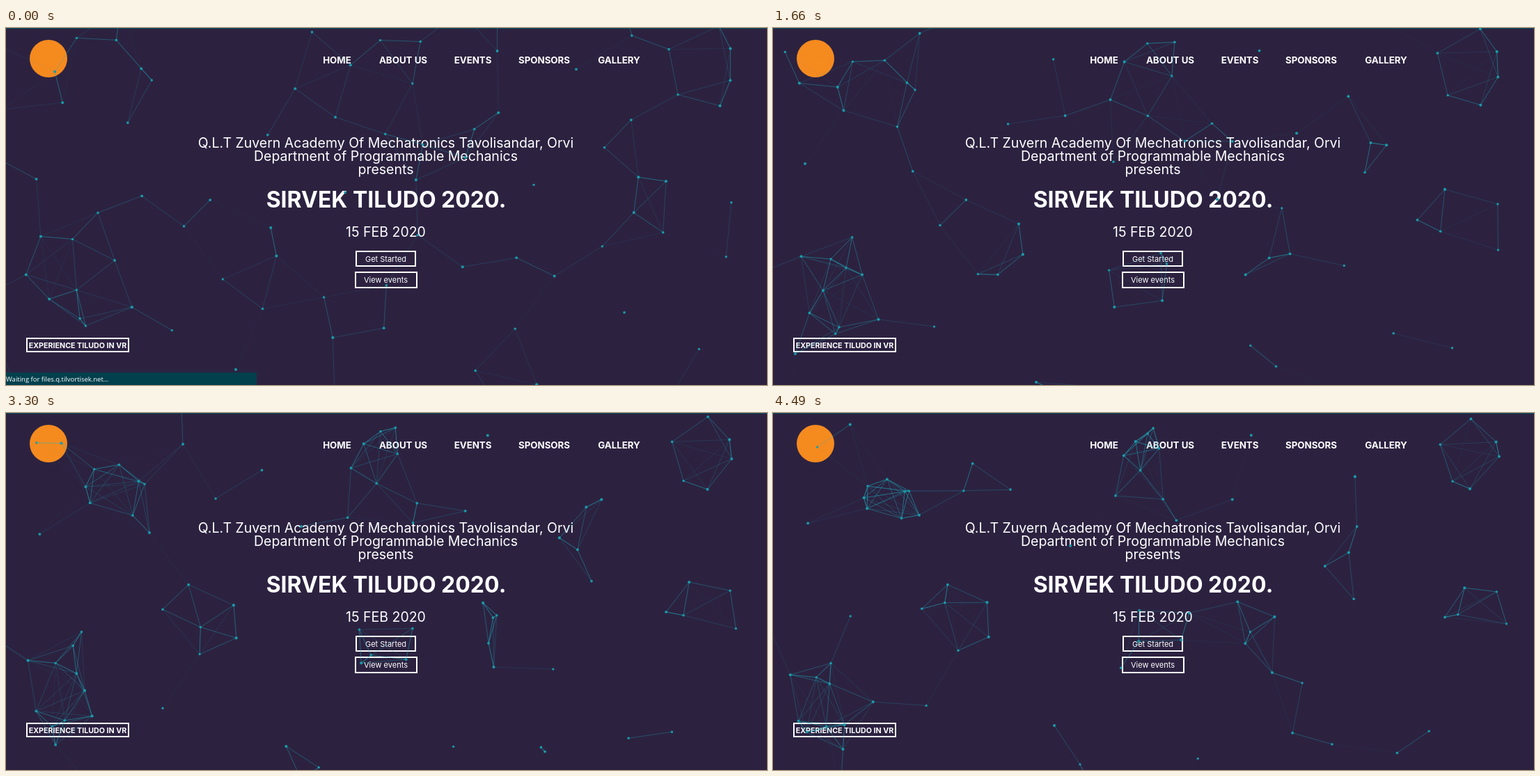
Recreate the animation shown at these times as an HTML page with a canvas. Size 1093 by 513 pixels, loop 4.57 s.

```html
<!DOCTYPE html>
<html lang="en">
<head>
<meta charset="utf-8">
<title>Event landing page</title>
<style>
  html, body { margin: 0; width: 100%; height: 100%; overflow: hidden; background: #2c2240; }
  svg, canvas { position: absolute; left: 0; top: 0; width: 1093px; height: 513px; }
  text { fill: #fff; font-family: Inter, sans-serif; text-anchor: middle; }
  .nav { font-size: 13.3px; font-weight: 700; }
  .lead { font-size: 19.5px; }
  .title { font-size: 32px; font-weight: 700; }
  .button { font-size: 11px; }
  .vr { font-size: 10.7px; font-weight: 700; }
  .frame { fill: none; stroke: #fff; stroke-width: 2; }
  .status { animation: hide 4570ms step-end infinite; }
  .status text { font: 9.5px "Open Sans", sans-serif; text-anchor: start; }
  @keyframes hide { 0% { opacity: 1; } 7%, 100% { opacity: 0; } }
</style>
</head>
<body>
<svg viewBox="0 0 1093 513">
  <rect width="1093" height="1" fill="#07535f"/>
  <circle cx="61" cy="44" r="27" fill="#f58a1f"/>
  <g class="nav">
    <text x="475.5" y="51">HOME</text>
    <text x="570.5" y="51">ABOUT US</text>
    <text x="670.5" y="51">EVENTS</text>
    <text x="773" y="51">SPONSORS</text>
    <text x="880.5" y="51">GALLERY</text>
  </g>
  <g class="lead">
    <text x="545.5" y="171.5">Q.L.T Zuvern Academy Of Mechatronics Tavolisandar, Orvi</text>
    <text x="545.5" y="191">Department of Programmable Mechanics</text>
    <text x="545.5" y="210">presents</text>
    <text x="545.5" y="300">15 FEB 2020</text>
  </g>
  <text class="title" x="546" y="258">SIRVEK TILUDO 2020.</text>
  <g class="button">
    <rect class="frame" x="503" y="321" width="85" height="21"/>
    <text x="545.5" y="335.5">Get Started</text>
    <rect class="frame" x="502" y="351" width="88" height="22"/>
    <text x="545.5" y="366">View events</text>
  </g>
  <rect class="frame" x="30" y="446" width="146" height="19"/>
  <text class="vr" x="103" y="460">EXPERIENCE TILUDO IN VR</text>
</svg>
<canvas id="net" width="1093" height="513"></canvas>
<svg class="status" viewBox="0 0 1093 513">
  <rect y="495" width="360" height="18" fill="#03404d"/>
  <text x="0" y="508">Waiting for files.q.tilvortisek.net...</text>
</svg>
<script>
const WIDTH = 1093, HEIGHT = 513, MARGIN = 50;
const LOOP = 4570, STEPS = 58, LINK = 100, LOOSE = 52, MAX_DRIFT = 270;
const ctx = document.getElementById("net").getContext("2d");

// Each cluster is a ring of particles whose centre and radius change steadily
const clusters = [
  { count: 7, from: { x: 140, y: 75, r: 85 }, to: { x: 165, y: 125, r: 40 } },
  { count: 8, from: { x: 110, y: 355, r: 95 }, to: { x: 60, y: 415, r: 60 } },
  { count: 5, from: { x: 330, y: 290, r: 85 }, to: { x: 270, y: 285, r: 65 } },
  { count: 6, from: { x: 535, y: 75, r: 90 }, to: { x: 535, y: 52, r: 35 } },
  { count: 4, from: { x: 500, y: 415, r: 65 }, to: { x: 555, y: 310, r: 50 } },
  { count: 6, from: { x: 1010, y: 50, r: 70 }, to: { x: 1010, y: 55, r: 60 } },
  { count: 5, from: { x: 980, y: 265, r: 85 }, to: { x: 1010, y: 280, r: 50 } }
];

let seed = 20;
function random() {
  seed = (seed * 16807) % 2147483647;
  return seed / 2147483647;
}

function onRing({ x, y, r }, angle, reach) {
  return { x: x + Math.cos(angle) * r * reach, y: y + Math.sin(angle) * r * reach };
}

function clusterParticles({ count, from, to }) {
  return Array.from({ length: count }, (_, i) => {
    const angle = (i + random()) / count * Math.PI * 2;
    const reach = 0.5 + random() * 0.5;
    return { from: onRing(from, angle, reach), to: onRing(to, angle + random() - 0.5, reach) };
  });
}

const particles = clusters.flatMap(clusterParticles);

function gapAround(point) {
  return Math.min(...particles.map(({ from }) => Math.hypot(from.x - point.x, from.y - point.y)));
}

// A loose particle takes the roomiest of a few random places
function looseParticle() {
  const places = Array.from({ length: 4 }, () => ({
    x: random() * (WIDTH + 2 * MARGIN) - MARGIN,
    y: random() * (HEIGHT + 2 * MARGIN) - MARGIN
  }));
  const from = places.reduce((best, place) => gapAround(place) > gapAround(best) ? place : best);
  const drift = () => (random() - 0.5) * MAX_DRIFT;
  return { from, to: { x: from.x + drift(), y: from.y + drift() } };
}

for (let i = 0; i < LOOSE; i++) particles.push(looseParticle());

function draw(progress) {
  const points = particles.map(({ from, to }) => ({
    x: from.x + (to.x - from.x) * progress,
    y: from.y + (to.y - from.y) * progress
  }));
  ctx.clearRect(0, 0, WIDTH, HEIGHT);
  ctx.strokeStyle = "#1fb5c3";
  points.forEach((a, i) => {
    for (const b of points.slice(i + 1)) {
      const distance = Math.hypot(a.x - b.x, a.y - b.y);
      if (distance >= LINK) continue;
      ctx.globalAlpha = 0.85 * (1 - distance / LINK);
      ctx.beginPath();
      ctx.moveTo(a.x, a.y);
      ctx.lineTo(b.x, b.y);
      ctx.stroke();
    }
  });
  ctx.globalAlpha = 1;
  ctx.fillStyle = "#1a9aa8";
  points.forEach(({ x, y }, i) => {
    ctx.beginPath();
    ctx.arc(x, y, 1.7 + (i % 4) * 0.12, 0, Math.PI * 2);
    ctx.fill();
  });
}

function tick() {
  const step = Math.floor(performance.now() % LOOP / LOOP * STEPS);
  draw(step / (STEPS - 1));
  requestAnimationFrame(tick);
}
tick();
</script>
</body>
</html>
```
